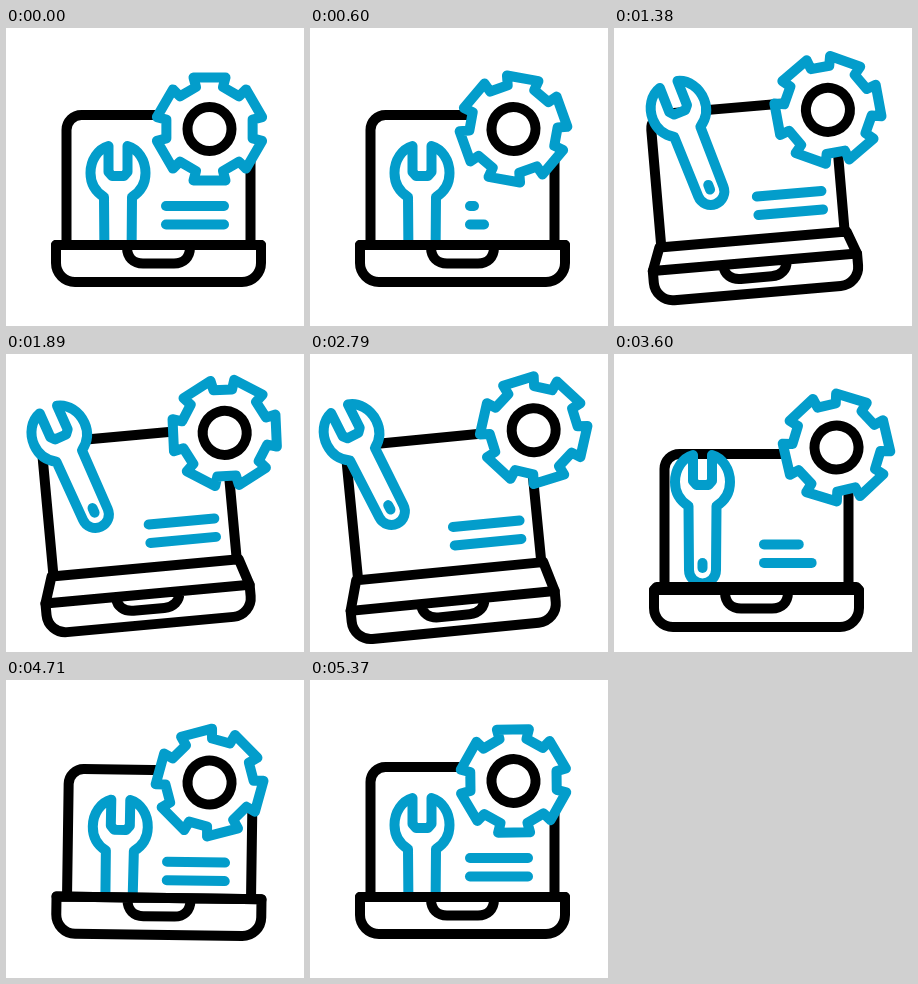
An HTML page that plays this animation: 298x298 px, repeating every 5.4 s.

```html
<!DOCTYPE html>
<html lang="en">
<head>
<meta charset="utf-8">
<title>Laptop service icon</title>
<style>
  html, body { margin: 0; width: 100%; height: 100%; overflow: hidden; background: #fff; }
  svg { display: block; width: 100vw; height: 100vh; }
  path, circle { fill: none; stroke: #000; stroke-width: 10; stroke-linecap: round; stroke-linejoin: round; }
  .blue { stroke: #039dcb; }
  .solid { fill: #fff; }
</style>
</head>
<body>
<svg viewBox="0 0 298 298">
  <g class="laptop">
    <path id="screen"/>
    <path id="line0" class="blue"/>
    <path id="line1" class="blue"/>
  </g>
  <g id="wrench">
    <path class="blue solid" d="M-9.5-25V1L-6 5H6L9.5 1V-25C20-22 27.5-11 27.5 2C27.5 14 22 21 14 26L13.5 90A13.5 13.5 0 0 1-13.5 90L-14 26C-22 21-27.5 14-27.5 2C-27.5-11-20-22-9.5-25Z"/>
    <path class="blue" d="M0 83V88"/>
  </g>
  <g class="laptop">
    <path id="base" class="solid"/>
    <path id="front"/>
  </g>
  <g id="gear">
    <path id="teeth" class="blue solid"/>
    <circle r="22"/>
  </g>
</svg>
<script>
const LOOP = 5400, STEP = 30, HOLD = 150;
const $ = id => document.getElementById(id);

// Parts are [x, y, tilt]; the case is [deck depth, front height, screen height].
const rest = { laptop: [152.5, 217, 0], case: [0, 37, 130], wrench: [112, 143, 0], gear: [203.5, 101, 0] };
const hop = { laptop: [146, 207, -1.8], case: [0, 34, 133], wrench: [87, 93, -15], gear: [203.5, 107, -6] };
const open = { laptop: [139, 211, -4.8], case: [22, 31, 133], wrench: [66, 80, -21], gear: [213, 82.5, -8] };
const drift = { laptop: [140, 219, -5.6], case: [30, 30, 134], wrench: [40, 77, -27], gear: [224, 76, -18] };
const land = { laptop: [142.5, 233, 0], case: [3, 37, 133], wrench: [88.5, 126, 0], gear: [222.5, 93.5, -2] };
const swing = { laptop: [154.5, 222.5, 3.2], case: [0, 37, 121], wrench: [121, 150, 4], gear: [204, 107, 4.5] };
const keys = [[0, rest], [620, rest], [1020, hop], [1290, open], [3060, drift],
  [3600, land], [4230, swing], [4950, rest], [LOOP, rest]];

// Smooth interpolation between poses that never overshoots them.
function pose(part, t) {
  const i = keys.findIndex(k => k[0] > t) - 1;
  const span = keys[i + 1][0] - keys[i][0], u = (t - keys[i][0]) / span;
  return rest[part].map((_, n) => {
    const value = j => keys[j][1][part][n];
    const slope = j => j < 0 || j > keys.length - 2 ? 0
      : (value(j + 1) - value(j)) / (keys[j + 1][0] - keys[j][0]);
    const tangent = j => {
      const p = slope(j - 1), q = slope(j);
      return p * q > 0 ? 2 * p * q / (p + q) : 0;
    };
    return value(i) + (value(i + 1) - value(i)) * u * u * (3 - 2 * u)
      + span * u * (1 - u) * ((1 - u) * tangent(i) - u * tangent(i + 1));
  });
}

function ease(u) {
  u = Math.min(1, Math.max(0, u));
  return u * u * (3 - 2 * u);
}

// Share of a text line that shows: it wipes out and back before each move.
function shown(t) {
  return [180, 3380].reduce((share, start) =>
    share - ease((t - start) / 500) + ease((t - start - 550) / 500), 1);
}

function place(el, [x, y, angle]) {
  el.setAttribute("transform", `translate(${x} ${y}) rotate(${angle})`);
}
function draw(id, d) { $(id).setAttribute("d", d); }

function gearPath() {
  const points = [];
  for (let k = 0; k < 6; k++) {
    const a = k * Math.PI / 3, cos = Math.cos(a), sin = Math.sin(a);
    for (const [x, y] of [[-13.5, -42], [-16, -51.5], [16, -51.5], [13.5, -42]])
      points.push([x * cos - y * sin, x * sin + y * cos]);
  }
  return "M" + points.join("L") + "Z";
}

function drawLaptop(t) {
  const [depth, height, rise] = pose("case", t);
  for (const g of document.querySelectorAll(".laptop")) place(g, pose("laptop", t));

  draw("screen", `M-92 0V${15 - rise}a15 15 0 0 1 15-15H77a15 15 0 0 1 15 15V0`);

  const lift = 39 + 1.2 * (rise - 130), full = 58 + 0.3 * depth;
  for (const i of [0, 1])
    draw("line" + i, `M7.5 ${18.5 * i - lift}h${full * shown(t - 80 * i)}`);

  const back = 102.5 - 8.5 * Math.min(1, depth / 10);
  const bend = depth + height - 19, dip = depth + height / 2;
  draw("base", `M${-back} 0H${back}L102.5 ${depth}V${bend}a19 19 0 0 1-19 19H-83.5a19 19 0 0 1-19-19V${depth}Z`);
  draw("front", `M-102.5 ${depth}H102.5M-31.5 ${depth + 2}C-31.5 ${dip - 6}-25 ${dip}-15.5 ${dip}H15.5C25 ${dip} 31.5 ${dip - 6} 31.5 ${depth + 2}`);
}

function frame(now) {
  const t = Math.floor(now % LOOP / STEP) * STEP;
  drawLaptop(t);
  place($("wrench"), pose("wrench", t));
  const [x, y, tilt] = pose("gear", t);
  const spin = 120 * Math.max(0, t - HOLD) / (LOOP - HOLD);
  place($("gear"), [x, y, tilt + spin]);
  requestAnimationFrame(frame);
}

draw("teeth", gearPath());
frame(performance.now());
</script>
</body>
</html>
```
